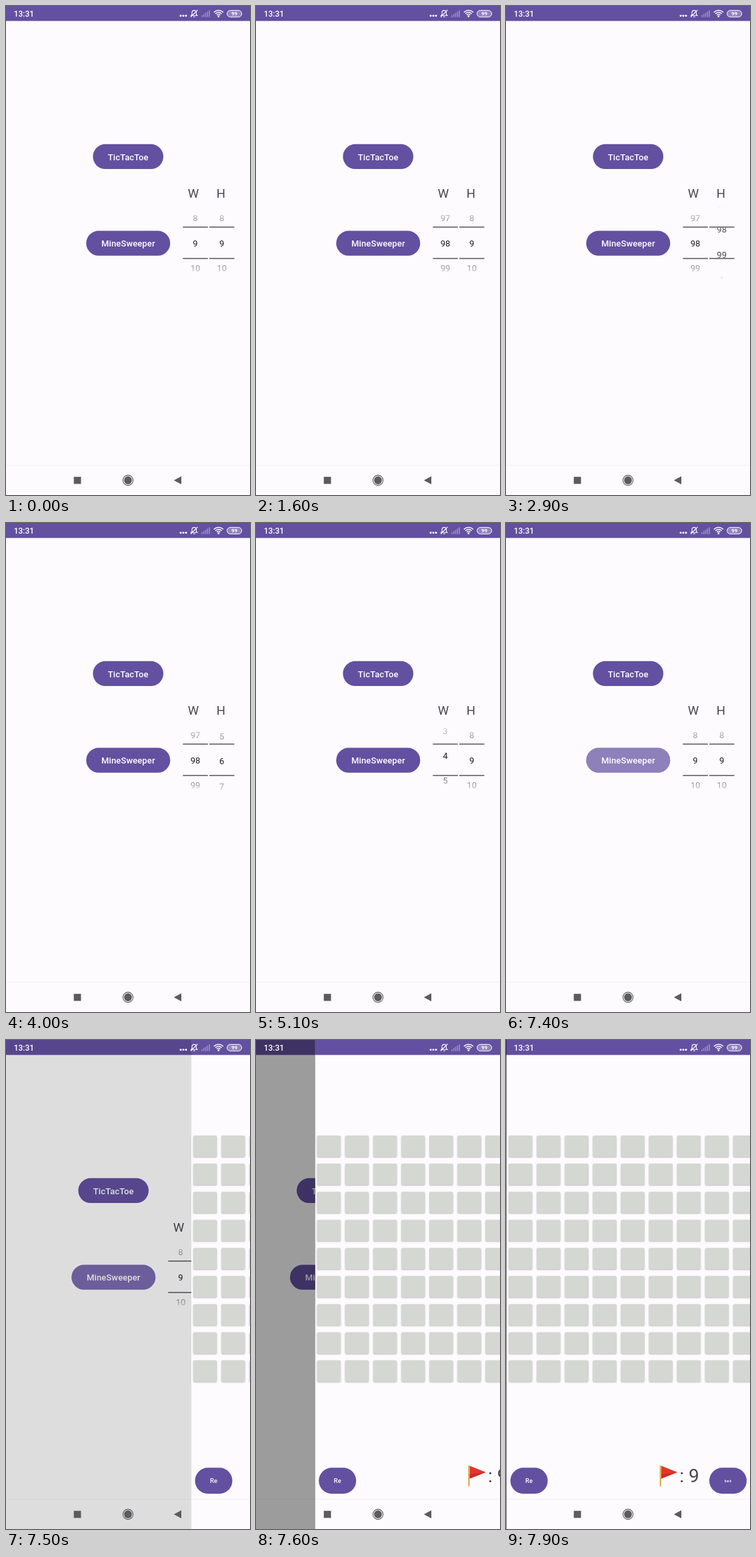
Animation of 366x732 px, one loop 8 s. Source, as an HTML page with a canvas:

```html
<!DOCTYPE html>
<html lang="en">
<head>
<meta charset="utf-8">
<title>Game menu</title>
<style>
  html, body { margin: 0; width: 100%; height: 100%; overflow: hidden; background: #fdfbfd; }
  canvas { display: block; width: 366px; height: 732px; }
</style>
</head>
<body>
<canvas id="stage"></canvas>
<script>
const W = 366, H = 732, LOOP = 8000, STEP = 100;
const BG = '#fdfbfd', PURPLE = '#6350a0', NAV = '#5c5b5e';
const canvas = document.getElementById('stage');
const ctx = canvas.getContext('2d');
const dpr = window.devicePixelRatio || 1;
canvas.width = W * dpr;
canvas.height = H * dpr;

// Wheel moves: start ms, end ms, from, to, ease-out power
const W_MOVES = [[420, 1600, 9, -1, 2], [4620, 5800, -1, 7, 2], [5900, 6500, 7, 9, 1.34]];
const H_MOVES = [[1920, 3200, 9, -1, 2], [3200, 4500, -1, 9, 1.244]];

const clamp = v => Math.min(1, Math.max(0, v));
const ramp = (t, a, b) => clamp((t - a) / (b - a));

function wheelValue(moves, t) {
  let value = moves[0][2];
  for (const [a, b, from, to, power] of moves) {
    if (t >= a) value = from + (to - from) * (1 - Math.pow(1 - ramp(t, a, b), power));
  }
  return value;
}

function rect(x, y, w, h, color) {
  ctx.fillStyle = color;
  ctx.fillRect(x, y, w, h);
}

function roundPath(x, y, w, h, r) {
  ctx.beginPath();
  ctx.roundRect(x, y, w, h, r);
}

function shape(points, color) {
  ctx.beginPath();
  points.forEach(([x, y]) => ctx.lineTo(x, y));
  ctx.closePath();
  ctx.fillStyle = color;
  ctx.fill();
}

function disc(x, y, r, color) {
  ctx.beginPath();
  ctx.arc(x, y, r, 0, Math.PI * 2);
  ctx.fillStyle = color;
  ctx.fill();
}

function text(str, x, y, size, color, weight = 400, align = 'center', spacing = 0) {
  ctx.font = `${weight} ${size}px Roboto, sans-serif`;
  ctx.letterSpacing = spacing + 'px';
  ctx.textAlign = align;
  ctx.fillStyle = color;
  ctx.fillText(str, x, y);
}

function pill(x, y, w, h, label, size, base) {
  roundPath(x, y, w, h, h / 2);
  ctx.fillStyle = PURPLE;
  ctx.fill();
  text(label, x + w / 2, base, size, '#fff', 500, 'center', 0.09);
}

function wheel(cx, value) {
  const top = 299, height = 112, row = 37.3, fade = 49;
  const x = cx - 18.7;
  ctx.save();
  ctx.beginPath();
  ctx.rect(x, top, 37.5, height);
  ctx.clip();
  const mid = Math.round(value);
  for (let n = mid - 2; n <= mid + 2; n++) {
    const shown = ((n - 1) % 99 + 99) % 99 + 1;
    text(shown, cx, 359.7 + (n - value) * row, 13.05, '#1c1b1f');
  }
  for (const [from, to] of [[top, top + fade], [top + height, top + height - fade]]) {
    const g = ctx.createLinearGradient(0, from, 0, to);
    g.addColorStop(0, BG);
    g.addColorStop(1, 'rgba(253,251,253,0)');
    rect(x, Math.min(from, to), 37.5, fade, g);
  }
  ctx.restore();
  for (const y of [330, 377]) rect(x, y, 37.5, 1.9, '#7b787d');
}

function pageBase() {
  rect(0, 0, W, H, BG);
  rect(0, 0, W, 22.4, PURPLE);
  rect(0, 687, W, 1, '#f3f1f3');
}

function ripple(t) {
  const alpha = 0.275 * ramp(t, 6620, 6760) * (1 - ramp(t, 7430, 7590));
  if (!alpha) return;
  ctx.save();
  roundPath(120.3, 336.5, 126, 37.3, 18.65);
  ctx.clip();
  disc(183, 355, 16 + 50 * ramp(t, 6620, 7150), `rgba(255,255,255,${alpha})`);
  ctx.restore();
}

function menuPage(t) {
  pageBase();
  pill(130.4, 206.8, 105.6, 37.3, 'TicTacToe', 13.05, 230.6);
  pill(120.3, 336.5, 126, 37.3, 'MineSweeper', 13.05, 360.3);
  ripple(t);
  text('W', 281, 287.4, 18.6, '#49454f');
  text('H', 322.5, 287.4, 18.6, '#49454f');
  wheel(284, wheelValue(W_MOVES, t));
  wheel(323.7, wheelValue(H_MOVES, t));
}

function flag() {
  rect(229.6, 637, 2.4, 31, '#dcb056');
  shape([[232, 637.5], [256, 647], [232, 656.5]], '#e5352d');
  shape([[232, 650], [256, 647], [232, 656.5]], '#cf2a27');
}

function gamePage() {
  pageBase();
  ctx.save();
  ctx.shadowColor = 'rgba(0,0,0,0.25)';
  ctx.shadowBlur = 2 * dpr;
  ctx.shadowOffsetY = 0.9 * dpr;
  ctx.fillStyle = '#d5d7d3';
  for (let r = 0; r < 9; r++) {
    for (let c = 0; c < 9; c++) {
      roundPath(3 + c * 42.1, 143 + r * 42.07, 35.4, 32, 1.9);
      ctx.fill();
    }
  }
  ctx.restore();
  pill(5.6, 640.3, 56, 39, 'Re', 9.3, 663.4);
  pill(304, 640.3, 56, 39, 'back', 4.65, 661.6);
  flag();
  text(': 9', 259.3, 662, 28, '#49454f', 400, 'left');
}

function statusIcons() {
  text('13:31', 11.7, 15.9, 12, '#fff', 500, 'left');
  for (const x of [262, 266, 270]) disc(x, 14.4, 1.5, '#fff');

  // Muted bell
  ctx.strokeStyle = '#fff';
  ctx.lineWidth = 1.1;
  ctx.beginPath();
  ctx.moveTo(277.5, 14.3);
  ctx.lineTo(279, 12.5);
  ctx.lineTo(279, 10);
  ctx.arc(282.2, 9.8, 3.2, Math.PI, 0);
  ctx.lineTo(285.4, 12.5);
  ctx.lineTo(287, 14.3);
  ctx.closePath();
  ctx.moveTo(281, 16.2);
  ctx.lineTo(283.5, 16.2);
  ctx.moveTo(277, 16.5);
  ctx.lineTo(287.5, 5.8);
  ctx.stroke();

  // Weak signal
  for (let i = 0; i < 5; i++) {
    rect(293 + i * 2.8, 14 - i * 1.9, 1.7, 2.5 + i * 1.9, 'rgba(255,255,255,0.35)');
  }

  // Wi-Fi
  ctx.lineWidth = 1.5;
  for (const r of [3.6, 6.6, 9.6]) {
    ctx.beginPath();
    ctx.arc(318.8, 16, r, -Math.PI * 0.76, -Math.PI * 0.24);
    ctx.stroke();
  }
  disc(318.8, 15.4, 1.4, '#fff');

  // Battery
  roundPath(331.6, 6.6, 22, 9.8, 4.9);
  ctx.fillStyle = 'rgba(255,255,255,0.3)';
  ctx.fill();
  ctx.lineWidth = 1;
  ctx.stroke();
  text('99', 342.6, 14.4, 8, '#fff', 700);
}

function navIcons() {
  rect(101.7, 704.8, 10.8, 10.6, NAV);
  disc(183, 710, 5.9, NAV);
  ctx.beginPath();
  ctx.arc(183, 710, 7.6, 0, Math.PI * 2);
  ctx.strokeStyle = NAV;
  ctx.lineWidth = 1.1;
  ctx.stroke();
  shape([[251.8, 710], [263, 704], [263, 716]], NAV);
}

// Remaining part of the page slide, critically damped
function slideLeft(t) {
  const x = Math.max(0, t - 7448) * 0.018;
  return (1 + x) * Math.exp(-x);
}

function draw(t) {
  ctx.setTransform(dpr, 0, 0, dpr, 0, 0);
  const left = slideLeft(t), done = 1 - left;
  ctx.save();
  ctx.translate(-done * W / 4, 0);
  menuPage(t);
  ctx.restore();
  if (done > 0) {
    rect(0, 0, W, H, `rgba(0,0,0,${done / 2})`);
    ctx.save();
    ctx.translate(left * W, 0);
    ctx.beginPath();
    ctx.rect(0, 0, W, H);
    ctx.clip();
    gamePage();
    ctx.restore();
  }
  statusIcons();
  navIcons();
}

const start = performance.now();
function tick() {
  const t = (performance.now() - start) % LOOP;
  draw(Math.floor(t / STEP) * STEP);
  requestAnimationFrame(tick);
}
tick();
</script>
</body>
</html>
```
